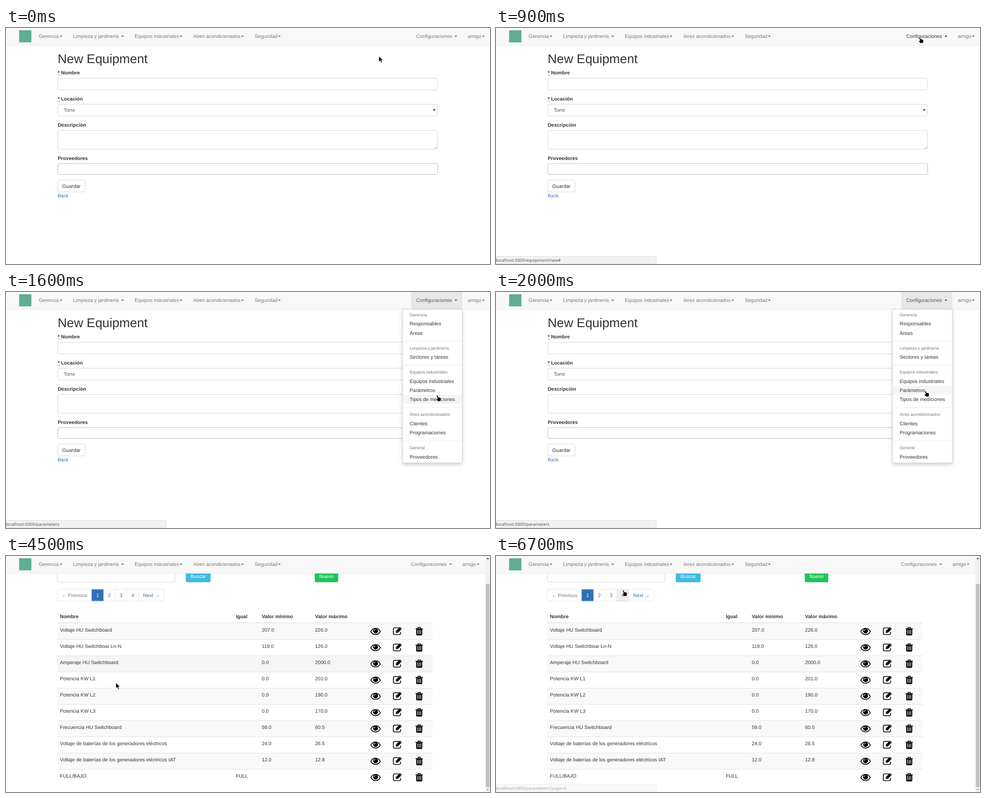
Recreate the animation shown at these times as an HTML page. Size 1068 px wide and 524 px high, loop 8 s.

```html
<!DOCTYPE html>
<html lang="es">
<head>
<meta charset="utf-8">
<title>Equipos</title>
<style>
  html, body { margin: 0; width: 100%; height: 100%; overflow: hidden; background: #fff; }
  svg { display: block; }
  text { font-family: "Liberation Sans", Arial, sans-serif; white-space: pre; text-rendering: geometricPrecision; }
  #status text { font-family: "Noto Sans", sans-serif; }
</style>
</head>
<body>
<svg id="stage" width="1068" height="524" viewBox="0 0 1068 524"></svg>
<script>
const LOOP = 8000, FONT = 10.95, SMALL = 9.38, SCROLL = 60.3;

// y is the middle of the text line
function text(x, y, str, { size = FONT, fill = '#333', bold = false, mid = false, id = '' } = {}) {
  return `<text x="${x}" y="${y + size * 0.3465}" font-size="${size}" fill="${fill}"` +
    `${bold ? ' font-weight="700"' : ''}${mid ? ' text-anchor="middle"' : ''}${id && ` id="${id}"`}>${str}</text>`;
}
const rect = (x, y, w, h, fill, attrs = '') =>
  `<rect x="${x}" y="${y}" width="${w}" height="${h}" fill="${fill}" ${attrs}/>`;
const box = (x, y, w, h, stroke = '#ccc', fill = '#fff', r = 3) =>
  rect(x + .4, y + .4, w - .8, h - .8, fill, `rx="${r}" stroke="${stroke}" stroke-width=".85"`);
const path = (d, attrs = '') => `<path d="${d}" ${attrs}/>`;
const caret = (x, fill = '#777') => path(`M${x} 17h6.4l-3.2 3.2z`, `fill="${fill}"`);
const group = (id, body, attrs = '') => `<g id="${id}" ${attrs}>${body}</g>`;

function navbar() {
  const left = [[72, 'Gerencia', 118], [148, 'Limpieza y jardinería', 254], [284, 'Equipos industriales', 383],
    [413.5, 'Aires acondicionados', 518.7], [549, 'Seguridad', 600]];
  const link = ([x, label, cx]) => text(x, 18.2, label, { fill: '#777' }) + caret(cx);
  return rect(0, 0, 1068, 38, '#f8f8f8') + rect(0, 38, 1068, .9, '#e7e7e7') +
    rect(29, 5, 27, 27, '#62ad91') + left.map(link).join('') +
    group('navRight', rect(894, 0, 113, 38.3, '#e7e7e7', 'id="openBack"') +
      group('config', text(905.2, 18.2, 'Configuraciones') + caret(989.6, 'inherit')) +
      link([1019, 'amigo', 1050.3]));
}

function formPage() {
  const label = (y, str, required) => required
    ? text(114.2, y, '*', { bold: true }) + text(121.4, y, str, { bold: true }) +
      path(`M114.2 ${y + 5}h4.8`, 'stroke="#333" stroke-dasharray="1 .8"')
    : text(114.2, y, str, { bold: true });
  return text(114, 68.4, 'New Equipment', { size: 28.15 }) +
    label(99.6, 'Nombre', true) + box(114, 111, 838, 27) +
    label(157.4, 'Locación', true) + box(114, 169, 838, 27) +
    text(127.5, 182.5, 'Torre', { fill: '#555' }) + path('M942 180h5.6l-2.8 5z', 'fill="#444"') +
    label(215.4, 'Descripción') + box(114, 227, 838, 42.5) +
    path('M945.5 268l5-5M948.5 268l2-2', 'stroke="#888" stroke-width=".8"') +
    label(289, 'Proveedores') + box(114, 300.7, 839, 25, '#aaa') +
    box(114, 337.3, 61, 27) + text(144.4, 351, 'Guardar', { mid: true }) +
    text(114, 372.2, 'Back', { fill: '#337ab7' });
}

function dropdown() {
  const sections = [['Gerencia', 'Responsables', 'Áreas'], ['Limpieza y jardinería', 'Sectores y tareas'],
    ['Equipos industriales', 'Equipos industriales', 'Parámetros', 'Tipos de mediciones'],
    ['Aires acondicionados', 'Clientes', 'Programaciones'], ['General', 'Proveedores']];
  let y = 50.7, out = '';
  sections.forEach(([head, ...items], i) => {
    if (i) {
      out += rect(875.5, y - 2.9, 131, .8, '#e5e5e5');
      y += 13.1;
    }
    out += text(890.8, y, head, { size: SMALL, fill: '#777' });
    y += 20;
    for (const item of items) {
      out += rect(875.5, y - 10.2, 131, 20.3, '#f5f5f5', `class="item" data-name="${item}"`) + text(890.8, y, item);
      y += 20.35;
    }
  });
  return path('M875 38.6H1007V376.5q0 3-3 3H878q-3 0-3-3z',
    'fill="#fff" stroke="#c4c4c4" stroke-width=".8" style="filter:drop-shadow(0 4px 4px rgba(0,0,0,.175))"') + out;
}

function icons(y) {
  const line = 'fill="none" stroke="#000" stroke-width="1.7"';
  const eye = path('M-10.5 0C-5.5-9.2 5.5-9.2 10.5 0C5.5 9.2-5.5 9.2-10.5 0z', line) +
    '<circle cy="-1" r="5.4"/>' + path('M-3-1.2Q-2.6-4 0-4', 'fill="none" stroke="#fff" stroke-width="1.1"');
  const edit = path('M3-7H-6.5Q-9.6-7-9.6-4V5Q-9.6 8-6.5 8H3.2Q6.3 8 6.3 5V2', line) +
    path('M-4 4.2V0L5-8.8 9.2-4.6 0 4.2z') + path('M4.4-6.3l3.2 3.2M-2.4 1.2l1.6 1.6', 'stroke="#fff" stroke-width=".9"');
  const trash = path('M-8.2-5.8H8.2M-3.3-6L-2.3-8.6H2.3L3.3-6', line) +
    path('M-6.7-5V6.5Q-6.7 9-4.5 9H4.5Q6.7 9 6.7 6.5V-5z') +
    path('M-3.4-3V6M0-3V6M3.4-3V6', 'stroke="#fff" stroke-width="1.3"');
  const put = (x, dy, icon) => `<g transform="translate(${x} ${y + dy})">${icon}</g>`;
  return put(815.5, 3.6, eye) + put(864.3, 2.6, edit) + put(911.8, 3.4, trash);
}

function listPage() {
  const rows = [['Voltaje HU Switchboard', '', '207.0', '226.0'], ['Voltaje HU Switchboar Ln-N', '', '119.0', '126.0'],
    ['Amperaje HU Switchboard', '', '0.0', '2000.0'], ['Potencia KW L1', '', '0.0', '201.0'],
    ['Potencia KW L2', '', '0.0', '190.0'], ['Potencia KW L3', '', '0.0', '170.0'],
    ['Frecuencia HU Switchboard', '', '59.0', '60.5'],
    ['Voltaje de baterías de los generadores eléctricos', '', '24.0', '26.5'],
    ['Voltaje de baterías de los generadores eléctricos IAT', '', '12.0', '12.8'], ['FULL/BAJO', 'FULL', '', '']];
  const columns = [119, 507.2, 564.4, 682];
  const cells = (y, row, bold) => row.map((str, i) => text(columns[i], y, str, { bold })).join('');
  const button = (x, w, label, fill) => rect(x, 92, w, 26.5, fill, 'rx="3"') +
    text(x + w / 2, 105.2, label, { fill: '#fff', mid: true });
  const edges = [113, 189.3, 215.3, 241, 266.8, 292.7, 348.8];
  const pages = ['← Previous', '1', '2', '3', '4', 'Next →'].map((label, i) => {
    const x = edges[i], w = edges[i + 1] - x, active = i === 1;
    return rect(x, 134, w, 26.6, active ? '#2f70b7' : '#fff', i === 4 ? 'id="page4"' : '') +
      (i ? rect(x - .4, 134, .8, 26.6, active ? '#2f70b7' : '#ddd') : '') +
      text(x + w / 2, 147.4, label, { mid: true, fill: active ? '#fff' : i ? '#2f70b7' : '#777' });
  }).join('');
  return text(527.3, 68.4, 'Parámetros', { size: 28.15, mid: true }) +
    box(112.8, 91.7, 260.5, 26.8) + button(396.7, 54.8, 'Buscar', '#3fbbe1') + button(681.3, 51.8, 'Nuevo', '#20c35c') +
    pages + box(112.8, 133.8, 236.2, 27, '#ddd', 'none') +
    cells(194.6, ['Nombre', 'Igual', 'Valor mínimo', 'Valor máximo'], true) + rect(113, 208, 828, 1.6, '#ddd') +
    rows.map((row, i) => {
      const y = 224.2 + 36.03 * i;
      return rect(113, y - 14.6, 828, 36, i % 2 ? '#fff' : '#f9f9f9', 'class="row"') +
        (i ? rect(113, y - 15, 828, .9, '#ddd') : '') + cells(y, row) + icons(y);
    }).join('');
}

const scrollbar = () => rect(1057.7, 0, 10.3, 524, '#f1f1f1') + rect(1058.7, 10.3, 8.4, 451, '#c1c1c1', 'id="thumb"') +
  path('M1060 7h6l-3-3.4z', 'id="arrowUp"') + path('M1060 517h6l-3 3.4z', 'id="arrowDown"');

const cursors = () =>
  group('arrow', path('M0 0V12.6L3.1 9.9 5.4 15 7.7 14 5.5 9.1H9.6z', 'fill="#000" stroke="#fff" stroke-width=".9"')) +
  group('hand', path('M0 1.2Q1.2-.6 2.4 1L4.2 5Q5.6 4 6.4 5.2 7.6 4.5 8.3 5.8 9.5 5.5 9.7 7V10.5L8.5 13.8H3.4L-.8 9.6Q-1.5 7.6.7 8L2 8.6z',
    'fill="#000" stroke="#fff" stroke-width=".9" stroke-linejoin="round"')) +
  group('beam', ['stroke="#fff" stroke-width="2"', 'stroke="#222" stroke-width=".9"'].map(look =>
    path('M-3-7Q0-7 0-5.5Q0-7 3-7M0-6V6M-3 7Q0 7 0 5.5Q0 7 3 7', `fill="none" ${look}`)).join(''));

document.getElementById('stage').innerHTML = rect(0, 0, 1068, 524, '#fff') +
  group('form', formPage()) + group('list', listPage()) + navbar() + group('menu', dropdown()) +
  group('bar', scrollbar()) +
  group('status', path('M0 507H350.5q3 0 3 3V524H0z', 'fill="#f2f2f2" stroke="#d4d4d4" stroke-width=".8"') +
    text(-.3, 516, '', { size: SMALL, fill: '#555', id: 'url' })) + cursors();

// start time, pointer, x, y, path in the status bar, hovered menu item or table row
const steps = [
  [0, 'arrow', 822.5, 62.5],
  [200, 'arrow', 836, 60],
  [300, 'arrow', 864, 50],
  [400, 'arrow', 895, 36],
  [500, 'hand', 922, 24],
  [600, 'hand', 933.5, 20],
  [800, 'hand', 933.5, 20, 'equipment/new#'],
  [1100, 'hand', 931, 62, 'responsibles', 'Responsables'],
  [1200, 'hand', 928, 90, 'areas', 'Áreas'],
  [1300, 'arrow', 927, 111, 'areas'],
  [1400, 'hand', 932, 148, 'sectors', 'Sectores y tareas'],
  [1500, 'hand', 941, 194, 'equipment', 'Equipos industriales'],
  [1600, 'hand', 950, 229, 'parameters', 'Tipos de mediciones'],
  [1700, 'hand', 953, 235, 'measurement_types', 'Tipos de mediciones'],
  [1900, 'hand', 949, 224, 'parameters', 'Parámetros'],
  [2000, 'hand', 946, 219, 'parameters', 'Parámetros'],
  [4000, 'beam', 214, 221.5, '', 0],
  [4500, 'arrow', 242.3, 281.3, '', 2],
  [5100, 'beam', 144, 222, '', 2],
  [5600, 'beam', 124, 160, '', 0],
  [6100, 'arrow', 425, 153, '', 0],
  [6700, 'hand', 279.5, 75.5, 'parameters?page=4']
];

const el = id => document.getElementById(id);
const show = (id, on) => el(id).setAttribute('display', on ? 'inline' : 'none');
const move = (id, x, y) => el(id).setAttribute('transform', `translate(${x} ${y})`);
const menuItems = document.querySelectorAll('.item'), tableRows = document.querySelectorAll('.row');

function render(t) {
  const [, pointer, x, y, url, hover] = steps.findLast(step => step[0] <= t);
  const onList = t >= 4000, scrolled = t >= 4500, open = t >= 1000 && !onList, lastPage = t >= 6700;
  show('form', !onList);
  show('list', onList);
  show('bar', onList);
  show('menu', open);
  show('openBack', open);
  move('navRight', onList ? -11.7 : 0, 0);
  const configFill = open ? '#555' : t >= 500 && !onList ? '#333' : '#777';
  for (const part of el('config').children) part.setAttribute('fill', configFill);

  move('list', 0, scrolled ? -SCROLL : 0);
  move('thumb', 0, scrolled ? 51.9 : 0);
  el('arrowUp').setAttribute('fill', scrolled ? '#505050' : '#a3a3a3');
  el('arrowDown').setAttribute('fill', scrolled ? '#a3a3a3' : '#505050');
  el('page4').setAttribute('fill', lastPage ? '#eee' : '#fff');
  menuItems.forEach(item => item.setAttribute('visibility', item.dataset.name === hover ? 'inherit' : 'hidden'));
  tableRows.forEach((row, i) => row.setAttribute('fill', i === hover ? '#f5f5f5' : i % 2 ? '#fff' : '#f9f9f9'));

  show('status', url);
  el('status').setAttribute('opacity', lastPage ? .5 : t < 900 ? .4 : 1);
  el('url').textContent = url ? 'localhost:5000/' + url : '';
  for (const id of ['arrow', 'hand', 'beam']) show(id, id === pointer);
  move(pointer, x, y);
}

const start = performance.now();
function tick() {
  render((performance.now() - start) % LOOP);
  requestAnimationFrame(tick);
}
render(0);
tick();
</script>
</body>
</html>
```
